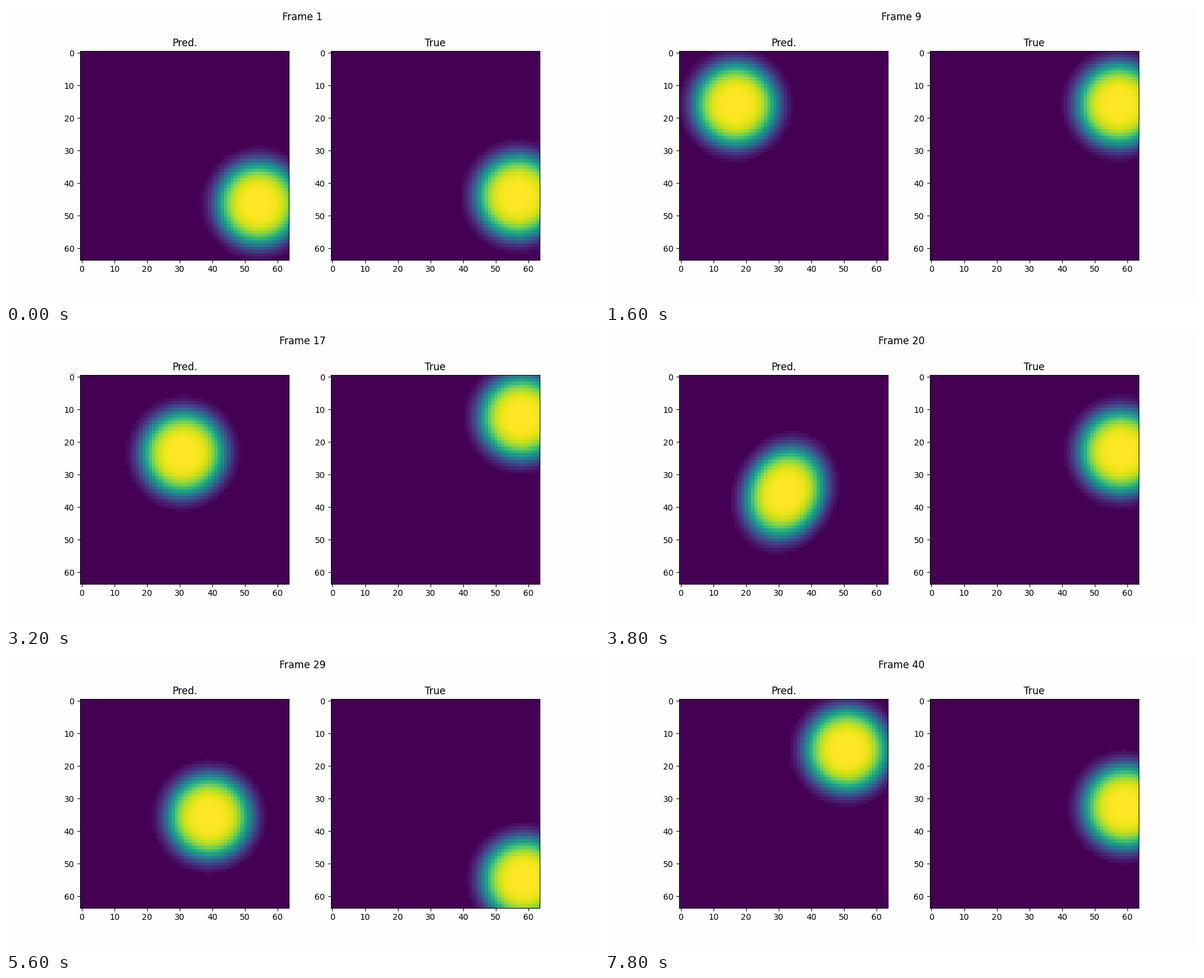
Recreate the animation shown at these times as a matplotlib script. Size 1000x500 px, loop 8000 ms.

```python
import numpy as np
import matplotlib.pyplot as plt
from matplotlib.animation import FuncAnimation

FRAMES = 40
INTERVAL = 200
SIZE = 64
HALF_RADIUS = 12.1
FALLOFF = 4.5
CUTOFF = .025

# Key points of the predicted path: step, x, y
STEPS, XS, YS = np.array([
    (1, 54, 46.2), (7, 26.5, 24.8), (11, 12, 9.8), (14, 25.8, 13.8),
    (20, 31.8, 35.5), (25, 32.8, 54.2), (34, 47.7, 5.2), (40, 50.7, 15),
]).T

rows, cols = np.mgrid[:SIZE, :SIZE]


def blob(x, y, width=1.0, height=1.0, shear=0.0):
    """Soft disc that reaches half intensity at HALF_RADIUS."""
    dx, dy = cols - x, rows - y
    r2 = (dx / width) ** 2 + (dy / height) ** 2 + 2 * shear * dx * dy
    value = .5 ** ((r2 / HALF_RADIUS ** 2) ** (FALLOFF / 2))
    return np.where(value < CUTOFF, 0, value)


def glide(step, points):
    """Smooth cubic curve through the key points."""
    slopes = np.gradient(points, STEPS)
    i = min(np.searchsorted(STEPS, step, side="right") - 1, len(STEPS) - 2)
    span = STEPS[i + 1] - STEPS[i]
    u = (step - STEPS[i]) / span
    ease = u * u * (3 - 2 * u)
    bend = u * (1 - u) * ((1 - u) * slopes[i] - u * slopes[i + 1])
    return points[i] + ease * (points[i + 1] - points[i]) + span * bend


def bump(step, centre):
    return np.exp(-((step - centre) / 2) ** 2)


def predicted(step):
    lean, wide = bump(step, 20), bump(step, 34)
    return blob(glide(step, XS), glide(step, YS),
                1 - .06 * lean + .06 * wide, 1 + .06 * lean, .14 * lean)


def actual(step):
    """Constant speed, bouncing off the top and bottom rows."""
    t = step - 1
    floor = SIZE - 1
    y = abs(44 - 3.525 * t)
    return blob(56.6 + .065 * t, floor - abs(floor - y))


fig, axes = plt.subplots(1, 2, figsize=(10, 5), dpi=100, facecolor="#fefefe")
heading = fig.suptitle("Frame 1")
panels = []
for ax, name, field in zip(axes, ("Pred.", "True"), (predicted, actual)):
    ax.set_title(name)
    panels.append((ax.imshow(field(1), cmap="viridis", vmin=0, vmax=1), field))


def update(index):
    step = index + 1
    heading.set_text(f"Frame {step}")
    for image, field in panels:
        image.set_data(field(step))


anim = FuncAnimation(fig, update, frames=FRAMES, interval=INTERVAL,
                     repeat=True, repeat_delay=0, blit=False)
plt.show()
```
